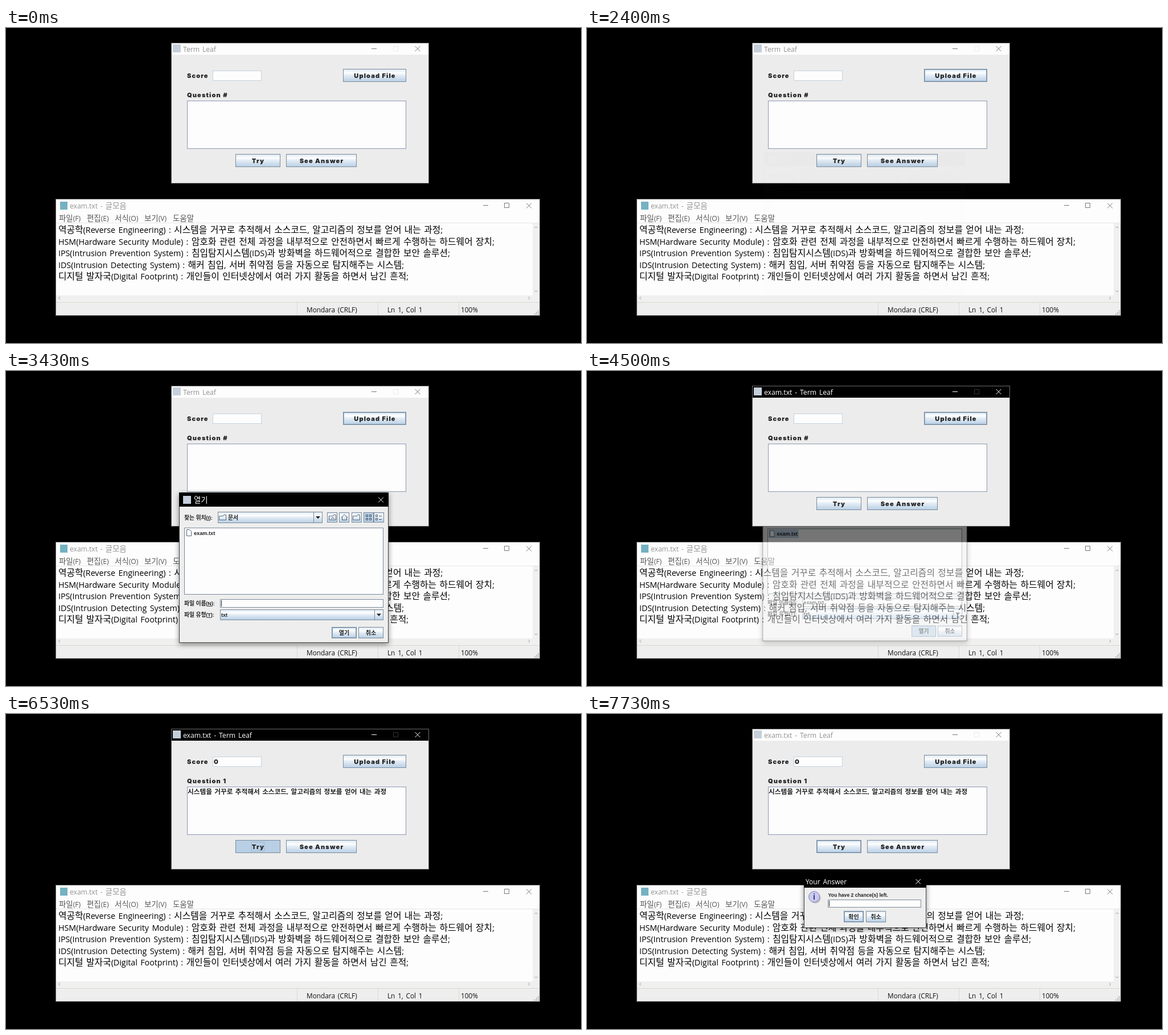
An HTML page for the animation above (8000 ms loop, 1010 px wide and 555 px high).

```html
<!DOCTYPE html>
<html lang="ko">
<head>
<meta charset="utf-8">
<style>
  html, body { margin: 0; width: 100%; height: 100%; overflow: hidden; background: #000; }
  svg { display: block; width: 1010px; height: 555px; }
  text { font-family: "Open Sans", "Noto Sans CJK KR", "Noto Sans CJK", sans-serif; word-spacing: 1.7px; white-space: pre; }
  .ko { font-family: "Noto Sans CJK KR", "Noto Sans CJK", sans-serif; font-size: 1.11em; }
  .heavy { font: 900 11px Inter, "DejaVu Sans", sans-serif; letter-spacing: 1.15px; word-spacing: 0; }
  .bold { font-family: "Liberation Sans", "Noto Sans CJK KR", "Noto Sans CJK", sans-serif; font-weight: 700; word-spacing: 0; }
  .question { font-weight: 700; }
  .popup { filter: drop-shadow(0 3px 5px rgba(0, 0, 0, .45)); }
</style>
</head>
<body>
<svg id="stage" viewBox="0 0 1010 555">
  <defs>
    <linearGradient id="metal" x2="0" y2="1">
      <stop offset="0" stop-color="#dde8f3"/>
      <stop offset=".3" stop-color="#fdfefe"/>
      <stop offset=".5" stop-color="#e3ecf5"/>
      <stop offset="1" stop-color="#b8cfe5"/>
    </linearGradient>
  </defs>
</svg>
<script>
const LOOP = 8000;
const PRESS_UPLOAD = 1030, CHOOSER_OPEN = 2400, PICK = 3500, CONFIRM = 4330, CHOOSER_CLOSE = 4400;
const LOADED = 4830, PRESS_TRY = 6530, PROMPT_OPEN = 6730;
const EDGE = '#7a8a99', FRAME = '#6c6c6c', PANEL = '#ececec', WHITE = '#fdfdfd', BLUE = '#b8cfe5';
const ICON = '#c5cfda', GRAY = '#929292', INK = '#222';

// Markup helpers
const fill = (x, y, w, h, color) => `<rect x="${x}" y="${y}" width="${w}" height="${h}" fill="${color}"/>`;
const box = (x, y, w, h, color, stroke = EDGE) =>
  `<rect x="${x + .5}" y="${y + .5}" width="${w - 1}" height="${h - 1}" fill="${color}" stroke="${stroke}"/>`;
const line = (d, color, width = 1) => `<path d="${d}" fill="none" stroke="${color}" stroke-width="${width}"/>`;
const text = (x, y, size, color, str, cls = '', anchor = 'start') =>
  `<text x="${x}" y="${y}" font-size="${size}" fill="${color}" class="${cls}" text-anchor="${anchor}">${
    str.replace(/[가-힣]+/g, '<tspan class="ko">$&</tspan>')
       .replace(/_(\w)/, '<tspan text-decoration="underline">$1</tspan>')}</text>`;
const heavy = (x, y, str, anchor) => text(x, y, 11, INK, str, 'heavy', anchor);
const when = (times, markup) => `<g data-on="${times.join()}">${markup}</g>`;
const close = (x, y, color, size = 9) => line(`M${x} ${y}l${size} ${size}m0 ${-size}l${-size} ${size}`, color);
const button = (x, y, w, h, label, size) => box(x, y, w, h, 'url(#metal)') +
  (size ? text(x + w / 2, y + h / 2 + 4, size, INK, label, 'bold', 'middle')
        : heavy(x + w / 2 + .5, y + h / 2 + 4.2, label, 'middle'));
const hover = (x, y, w, h) => box(x + 1, y + 1, w - 2, h - 2, 'none', '#8fabc9');
const pressed = (x, y, w, h, label) => box(x, y, w, h, BLUE) +
  box(x + w / 2 - 12, y + 3, 24, h - 6, 'none', '#a3b8cc') + heavy(x + w / 2 + .5, y + h / 2 + 4.2, label, 'middle');

function editor() {
  const rows = [
    '역공학(Reverse Engineering) : 시스템을 거꾸로 추적해서 소스코드, 알고리즘의 정보를 얻어 내는 과정;',
    'HSM(Hardware Security Module) : 암호화 관련 전체 과정을 내부적으로 안전하면서 빠르게 수행하는 하드웨어 장치;',
    'IPS(Intrusion Prevention System) : 침입탐지시스템(IDS)과 방화벽을 하드웨어적으로 결합한 보안 솔루션;',
    'IDS(Intrusion Detecting System) : 해커 침입, 서버 취약점 등을 자동으로 탐지해주는 시스템;',
    '디지털 발자국(Digital Footprint) : 개인들이 인터넷상에서 여러 가지 활동을 하면서 남긴 흔적;'
  ];
  const menu = [[93, '파일(F)'], [142, '편집(E)'], [191, '서식(O)'], [243, '보기(V)'], [293, '도움말']];
  let grip = '';
  for (let r = 0; r < 3; r++)
    for (let c = 0; c <= r; c++) grip += fill(934 - c * 3, 497 + r * 3, 2, 2, '#b5b5b5');
  return fill(87, 301, 850, 206, WHITE) + fill(95, 306, 13, 14, '#74b2c2') +
    text(112, 317.5, 12.1, GRAY, 'exam.txt - 글모음') +
    line('M838 312.5h9M875.5 308.5h8v8h-8z', '#777') + close(914, 308.5, '#777') +
    menu.map(([x, s]) => text(x, 340, 12.1, '#555', s)).join('') +
    line('M87 343.5h850', '#e6e6e0') +
    rows.map((s, i) => text(92, 361 + i * 20.6, 14.25, '#000', s)).join('') +
    fill(925, 344, 12, 139, '#f0f0f0') + fill(87, 471, 850, 12, '#f0f0f0') +
    line('M928.5 352.5l2.5-2.5 2.5 2.5M928.5 462.5l2.5 2.5 2.5-2.5' +
      'M95 473.5l-2.5 2.5 2.5 2.5M917.5 473.5l2.5 2.5-2.5 2.5', '#999') +
    fill(87, 483, 850, 24, '#eee') + line('M87 483.5h850M511.5 484v22M653.5 484v22M795.5 484v22', '#dadad0') +
    text(528, 500.5, 11.8, '#111', 'Mondara (CRLF)') + text(670, 500.5, 11.8, '#111', 'Ln 1, Col 1') +
    text(799, 500.5, 11.8, '#111', '100%') + grip + box(87, 301, 851, 206, 'none', FRAME);
}

function quiz() {
  const name = 'Term Leaf', fileName = 'exam.txt - ' + name;
  const title = (times, str, active) => when(times,
    fill(290, 26, 452, 21, active ? '#000' : WHITE) + fill(293, 29, 14, 14, ICON) +
    text(311, 41.7, 12.2, active ? '#fff' : GRAY, str) +
    line('M642 36.5h9', active ? '#fff' : '#777') +
    line('M680.5 32.5h8v8h-8z', active ? '#333' : '#ebebe2') +
    close(718.5, 32, active ? '#fff' : '#777'));
  const upload = [592, 72, 111, 23], attempt = [403, 222, 79, 23];
  return fill(290, 26, 452, 247, PANEL) +
    title([0, PRESS_UPLOAD, CHOOSER_OPEN, CHOOSER_CLOSE], name, false) +
    title([PRESS_UPLOAD, CHOOSER_OPEN], name, true) +
    title([CHOOSER_CLOSE, PROMPT_OPEN], fileName, true) +
    title([PROMPT_OPEN, LOOP], fileName, false) +
    heavy(318, 87.5, 'Score') + box(363, 75, 86, 18, WHITE, '#c5d3e2') +
    when([LOADED, LOOP], heavy(365, 88, '0')) +
    button(...upload, 'Upload File') +
    when([PRESS_UPLOAD + 100, 5330], hover(...upload)) +
    when([PRESS_UPLOAD, PRESS_UPLOAD + 100], pressed(...upload, 'Upload File')) +
    when([0, LOADED], heavy(318, 122, 'Question #')) +
    when([LOADED, LOOP], heavy(318, 122, 'Question 1')) +
    box(318, 128, 385, 85, WHITE, '#8c98b2') +
    when([LOADED, LOOP], text(319, 141, 10.5, INK,
      '시스템을 거꾸로 추적해서 소스코드, 알고리즘의 정보를 얻어 내는 과정', 'question')) +
    button(...attempt, 'Try') + button(492, 222, 124, 23, 'See Answer') +
    when([5600, PRESS_TRY, PRESS_TRY + 100, LOOP], hover(...attempt)) +
    when([PRESS_TRY, PRESS_TRY + 100], pressed(...attempt, 'Try')) +
    box(290, 26, 453, 248, 'none', FRAME);
}

function chooser() {
  const folder = (x, y) => line(`M${x} ${y + 2}h7l1-2h4v9h-12z`, '#556677');
  const combo = (x, y, w, h) => box(x, y, w, h, 'url(#metal)') + line(`M${x + w - 15.5} ${y}v${h}`, EDGE) +
    `<path d="M${x + w - 12} ${y + h / 2 - 2}h8l-4 4.5z" fill="#222"/>`;
  const tools = [564, 585, 607, 628, 646].map((x, i) =>
    box(x, 249, 18, 18, i === 3 ? BLUE : 'url(#metal)')).join('');
  const grid = [[632, 253], [638, 253], [632, 259], [638, 259]]
    .map(([x, y]) => box(x, y, 4, 4, 'none', '#456')).join('');
  return box(304, 214, 368, 265, '#eee', '#444') + fill(304, 214, 368, 25, '#000') +
    fill(311, 220, 14, 14, ICON) + text(330, 231.5, 12, '#fff', '열기') + close(654, 222.5, '#fff') +
    text(313, 262, 8.8, INK, '찾는 위치(_I):', 'bold') + combo(372, 248, 184, 20) +
    folder(374.5, 253.5) + text(390, 262, 8.8, INK, '문서', 'bold') +
    tools + folder(567.5, 253.5) + line('M571 261l3-3 3 3', '#456') +
    line('M589 258l5.5-5 5.5 5M590.5 257.5v5h8v-5', '#456') + folder(609.5, 253.5) + grid +
    line('M649.5 253.5h3v3h-3zM649.5 259.5h3v3h-3zM655 255.5h5M655 261.5h5', '#456') +
    box(313, 276, 350, 118, WHITE) + when([PICK, LOOP], fill(315, 278, 54, 15, BLUE)) +
    '<path d="M317.5 279.5h5l3 3v8h-8z" fill="#fff" stroke="#567"/>' +
    text(330, 288.5, 9.2, INK, 'exam.txt', 'bold') +
    text(313, 413, 8.8, INK, '파일 이름(_N):', 'bold') + box(376, 402, 287, 15, WHITE) +
    when([PICK, LOOP], text(378, 413, 9, INK, 'exam.txt', 'bold')) +
    when([CHOOSER_OPEN, 2930, 3430, PICK], fill(378, 404, 1, 11, '#222')) +
    when([PICK, 4130], fill(415, 404, 1, 11, '#222')) +
    text(313, 433, 8.8, INK, '파일 유형(_T):', 'bold') + combo(376, 420, 287, 19) +
    text(378, 433, 9, INK, 'txt', 'bold') +
    button(572, 451, 44, 20, '열기', 9) + hover(572, 451, 44, 20) +
    when([CONFIRM, LOOP], box(572, 451, 44, 20, BLUE) + text(594, 465, 9, INK, '열기', 'bold', 'middle')) +
    button(619, 451, 44, 20, '취소', 9);
}

function prompt() {
  return box(381, 285, 215, 92, '#eee', '#444') + fill(381, 285, 215, 21, '#000') +
    text(384, 300, 12, '#fff', 'Your Answer') + close(577.5, 291, '#fff', 8.5) +
    '<circle cx="401" cy="324" r="9.5" fill="#bbb"/>' +
    '<circle cx="399" cy="322" r="9.5" fill="#cacaf2" stroke="#8585b8"/>' +
    text(399, 327, 14, '#34346a', 'i', 'bold', 'middle') +
    text(423.5, 322, 8.65, INK, 'You have 2 chance(s) left.', 'bold') +
    box(423, 327, 164, 14, WHITE) +
    when([PROMPT_OPEN, 7230, 7730, LOOP], fill(425, 329, 1, 10, '#222')) +
    button(451, 347, 35, 20, '확인', 9) + hover(451, 347, 35, 20) + button(490, 347, 35, 20, '취소', 9);
}

const stage = document.getElementById('stage');
stage.insertAdjacentHTML('beforeend', editor() +
  `<g id="under"></g>${quiz()}<g id="over"></g>` +
  `<g id="chooser" class="popup">${chooser()}</g><g id="prompt" class="popup">${prompt()}</g>`);
const el = id => document.getElementById(id);
const timed = [...stage.querySelectorAll('[data-on]')].map(node => [node, node.dataset.on.split(',').map(Number)]);

const clamp = v => Math.max(0, Math.min(1, v));
const appear = (t, start) => 1 - (1 - clamp((t - start) / 270)) ** 2;

function pose(node, cx, cy, scale, opacity) {
  node.setAttribute('transform', `translate(${cx} ${cy}) scale(${scale}) translate(${-cx} ${-cy})`);
  node.style.opacity = opacity;
  node.style.display = opacity > 0 ? '' : 'none';
}

function render(t) {
  for (const [node, times] of timed) {
    const on = times.some((start, i) => i % 2 === 0 && t >= start && t < times[i + 1]);
    node.style.display = on ? '' : 'none';
  }
  const shown = appear(t, CHOOSER_OPEN), gone = clamp((t - CHOOSER_CLOSE) / 200);
  // The closing chooser fades away behind the reactivated quiz window.
  const layer = el(t < CHOOSER_CLOSE ? 'over' : 'under');
  if (el('chooser').parentNode !== layer) layer.append(el('chooser'));
  pose(el('chooser'), 488, 346.5, .96 + .04 * shown - .045 * gone, shown * (1 - gone) ** 1.1);
  const asked = appear(t, PROMPT_OPEN);
  pose(el('prompt'), 488.5, 331, .96 + .04 * asked, asked);
}

const began = performance.now();
function tick() {
  render((performance.now() - began) % LOOP);
  requestAnimationFrame(tick);
}
tick();
</script>
</body>
</html>
```
